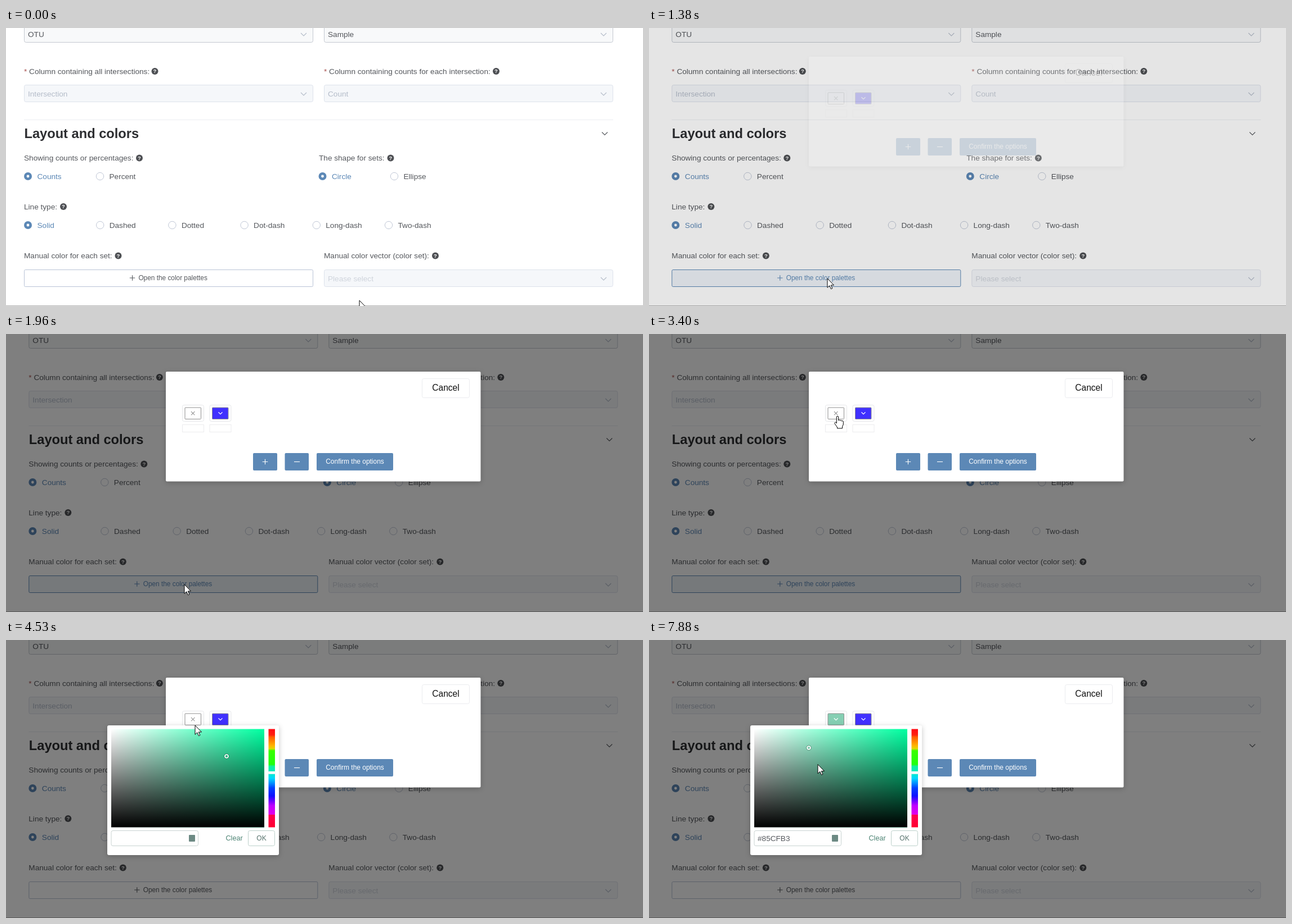
An HTML page that plays this animation: 1132 by 495 pixels, repeating every 8 s.

```html
<!DOCTYPE html>
<html lang="en">
<head>
<meta charset="utf-8">
<title>Color palette dialog</title>
<style>
  html, body { margin: 0; width: 100%; height: 100%; overflow: hidden; background: #fff; }
  svg { display: block; width: 1132px; height: 495px; font: 13.62px "Liberation Sans", Arial, sans-serif; }
  .line { fill: none; stroke-width: 1.1; }
  .shadow { filter: drop-shadow(0 2px 5px rgba(0, 0, 0, .22)); }
</style>
</head>
<body>
<svg id="stage" viewBox="0 0 1132 495">
  <defs>
    <linearGradient id="saturation"><stop stop-color="#fff"/><stop offset="1" stop-color="#00ffa1"/></linearGradient>
    <linearGradient id="value" x2="0" y2="1"><stop stop-color="#000" stop-opacity="0"/><stop offset="1"/></linearGradient>
    <linearGradient id="hue" x2="0" y2="1"></linearGradient>
  </defs>
</svg>
<script>
const LOOP = 8000;
const INK = '#55585d', PRIMARY = '#5c88b6', MUTED = '#b4bcc9';
const $ = id => document.getElementById(id);

// Text is placed by its vertical middle, with the baseline on a whole pixel
const text = (x, y, str, fill = INK, extra = '') =>
  `<text x="${x}" y="${Math.round(y + 4.8)}" fill="${fill}" ${extra}>${str}</text>`;
const box = (x, y, w, h, fill, stroke = 'none', r = 3, extra = '') =>
  `<rect x="${x}" y="${y}" width="${w}" height="${h}" rx="${r}" fill="${fill}" stroke="${stroke}" ${extra}/>`;
const path = (d, stroke, extra = '') => `<path class="line" d="${d}" stroke="${stroke}" ${extra}/>`;
const chevron = (x, y, stroke, s = 5) =>
  path(`M${x - s} ${y - s / 2}l${s} ${s} ${s} ${-s}`, stroke);
const plus = (x, y, stroke, extra) => path(`M${x - 4.7} ${y}h9.4m-4.7-4.7v9.4`, stroke, extra);

const help = (x, y) => `<circle cx="${x}" cy="${y}" r="6" fill="#4e5054"/>` +
  text(x, y - 1.4, '?', '#fff', 'font-size="9.5" font-weight="bold" text-anchor="middle"');
const label = (x, y, str, helpX) => text(x, y, str) + help(helpX, y);
const required = '<tspan fill="#a8504e">*</tspan> ';

const select = (x, y, str, fill, stroke, color) =>
  box(x + .5, y - 15.5, 513, 30, fill, stroke) + text(x + 7, y, str, color) + chevron(x + 497, y + .5, MUTED);

const radio = (x, y, str, on) => (on
  ? `<circle cx="${x}" cy="${y}" r="7" fill="${PRIMARY}"/><circle cx="${x}" cy="${y}" r="2.4" fill="#fff"/>`
  : `<circle cx="${x}" cy="${y}" r="6.7" fill="#fff" stroke="#c0c7d6"/>`) +
  text(x + 16.5, y, str, on ? PRIMARY : INK);

const lineTypes = ['Solid', 'Dashed', 'Dotted', 'Dot-dash', 'Long-dash', 'Two-dash'];

const page = `<rect width="1132" height="495" fill="#fff"/><g id="page">
  ${select(32, 11, 'OTU', '#f8f9fa', '#c3c8d0', INK)}
  ${select(565, 11, 'Sample', '#f8f9fa', '#c3c8d0', INK)}
  ${label(32, 77, required + 'Column containing all intersections:', 264.5)}
  ${label(565, 77, required + 'Column containing counts for each intersection:', 871)}
  ${select(32, 117, 'Intersection', '#f5f7fa', '#dde2eb', MUTED)}
  ${select(565, 117, 'Count', '#f5f7fa', '#dde2eb', MUTED)}
  ${path('M32 163.5H1079', '#ebedf2')}
  ${text(32.5, 190.8, 'Layout and colors', '#2d2e31', 'font-size="23.65" font-weight="bold"')}
  ${chevron(1064, 188, '#55585d')}
  ${label(32, 231.5, 'Showing counts or percentages:', 237)}
  ${label(556, 231.5, 'The shape for sets:', 683.5)}
  ${radio(39, 264, 'Counts', true)}${radio(167, 264, 'Percent')}
  ${radio(562.5, 264, 'Circle', true)}${radio(690, 264, 'Ellipse')}
  ${label(32, 318, 'Line type:', 102)}
  ${lineTypes.map((name, i) => radio(39 + i * 128.2, 351, name, i === 0)).join('')}
  ${label(32, 405.5, 'Manual color for each set:', 199.5)}
  ${label(565, 405.5, 'Manual color vector (color set):', 763)}
  ${box(32.5, 430.5, 513, 30, '#fff', '#b9c3d6', 2, 'id="open"')}
  ${plus(224.5, 445, INK, 'id="openPlus"')}
  ${text(235.4, 444.6, 'Open the color palettes', INK, 'id="openText" font-size="11.85"')}
  ${select(565, 446, 'Please select', '#f5f7fa', '#dde2eb', '#cfd4dc')}
  </g>${path('M0 494.5H1132', '#b4b4b4')}
  <rect id="overlay" width="1132" height="495" opacity="0"/>`;

const swatch = (x, fill, id) =>
  box(x + .5, 126.5, 38, 29, '#fff', '#e6e7ea') +
  box(x + 5, 131, 28.5, 20.5, fill, '#8f8f8f', 1, `id="${id}"`) +
  box(x + .5, 161.5, 38, 13, '#fff', '#ececee', 0);

const modal = `<g id="modal" opacity="0">
  ${box(284, 67, 559.5, 195.5, '#fff', 'none', 2, 'class="shadow"')}
  ${box(739.5, 79.5, 84, 34, '#fff', '#ebecef')}
  ${text(781.5, 96.5, 'Cancel', '#111', 'font-size="15.6" text-anchor="middle"')}
  ${swatch(313, '#fff', 'picked')}${swatch(361.5, '#4030ff', 'second')}
  ${path('M329 138l6.4 6.4m0-6.4l-6.4 6.4', '#9a9a9a', 'id="cross"')}
  <g id="pickedMark">${chevron(332.3, 141, '#fff', 3.5)}</g>${chevron(381, 141, '#fff', 3.5)}
  ${box(439, 212, 43, 31, PRIMARY, 'none', 2)}${plus(460.5, 227.5, '#fff')}
  ${box(495.5, 212, 42.5, 31, PRIMARY, 'none', 2)}${path('M512 227.5h10', '#fff')}
  ${box(552, 212, 136, 31, PRIMARY, 'none', 2)}
  ${text(620, 226.6, 'Confirm the options', '#fff', 'font-size="11.95" text-anchor="middle"')}
  </g>`;

const picker = `<g id="picker">
  ${box(180, 152, 305, 231, '#fff', 'none', 3, 'class="shadow"')}
  ${box(187, 158.5, 272, 175, 'url(#saturation)', 'none', 0)}
  ${box(187, 158.5, 272, 175, 'url(#value)', 'none', 0)}
  <g id="marker" fill="none"><circle r="4.2" stroke="#2a5a48" stroke-opacity=".7"/><circle r="3" stroke="#fff" stroke-width="1.7"/></g>
  ${box(466.5, 158.5, 11.5, 175, 'url(#hue)', 'none', 0)}
  ${box(466, 234, 12.5, 4.5, '#fff', '#e8e8e8', 1, 'stroke-width=".5"')}
  ${box(187, 339.5, 154.5, 27, '#fff', '#c9d3d2')}
  ${text(193, 353, '', INK, 'id="hex"')}
  ${box(325, 347, 11, 12, '#6d8a84', 'none', 1)}
  ${text(390.5, 352.6, 'Clear', '#4d8474', 'font-size="12.6"')}
  ${box(430.5, 339.5, 47, 27, '#fff', '#bcd0ca')}
  ${text(454, 352.6, 'OK', '#54706a', 'font-size="12" text-anchor="middle"')}
  </g>`;

const cursor = `<g id="cursor" stroke="#000" fill="#fff" stroke-linejoin="round">
  <path id="arrow" d="M0 0V16.3l3.8-3.6 2.6 6 2.5-1.1-2.6-5.7H11.5z"/>
  <path id="hand" d="M-1.7 13V2a1.7 1.7 0 0 1 3.4 0V8a1.6 1.6 0 0 1 3 .5a1.6 1.6 0 0 1 3 .8a1.4 1.4 0 0 1 2.6 .8V15l-1.8 4V22H-.5V20L-5 13.5a1.6 1.6 0 0 1 2.4-2z"/>
  <path id="aim" d="M-14 0H14M0-14V14"/></g>`;

$('stage').innerHTML += page + modal + picker + cursor;

// Hue strip: percentage of the height, color
$('hue').innerHTML = [
  [0, '#ff0a14'], [6, '#ff2010'], [8, '#ff5a00'], [17, '#ffb400'], [20, '#e0d800'], [22, '#38ff00'],
  [36, '#20ff10'], [38, '#10f0a0'], [46, '#00e8d0'], [50, '#00d8ff'], [55, '#0090ff'], [60, '#0040ff'],
  [68, '#1010ff'], [73, '#6800ff'], [78, '#c000ff'], [87, '#e000e8'], [87, '#ff0050'], [100, '#ff0030']
].map(([p, c]) => `<stop offset="${p}%" stop-color="${c}"/>`).join('');

// Cursor moves: first step, last step, number of steps, points passed
const moves = [
  [80, 810, 9, [[628, 485], [317, 446]]],
  [2380, 3130, 9, [[317, 446], [352, 405], [390, 310], [365, 215], [345, 163]]],
  [3240, 3330, 2, [[345, 163], [335, 146]]],
  [4530, 4530, 1, [[335, 146], [336, 152]]],
  [4624, 5000, 5, [[336, 152], [345, 187]]],
  [6110, 6210, 2, [[345, 187], [335, 186]]],
  [7050, 7420, 5, [[335, 186], [284, 192]]],
  [7810, 7880, 2, [[284, 192], [300, 221.5]]]
];
// Time, overlay opacity, dialog opacity
const dialogFade = [[0, 0, 0], [1180, .02, .03], [1280, .04, .06], [1380, .1, .2], [1810, .36, .48], [1960, .5, 1]];
const pickerZoom = [[0, 0], [3760, .2], [3860, .5], [4060, .75], [4110, .9], [4160, 1]];
// Time, marker x, marker y, color
const picks = [[0, 392, 207, ''], [5280, 345, 187, '#5AD7A8'], [6570, 335, 187, '#62D7AB'], [7600, 284, 192, '#85CFB3']];
const presses = [[5100, 5280], [6400, 6570], [7420, 7600]];

const latest = (list, t) => list.filter(entry => entry[0] <= t).pop();
const show = (id, on) => $(id).setAttribute('display', on ? 'inline' : 'none');
const set = (id, name, value) => $(id).setAttribute(name, value);

function cursorAt(t) {
  const move = latest(moves, t);
  if (!move) return moves[0][3][0];
  const [start, end, count, points] = move;
  const step = t >= end ? count : Math.floor((t - start) * (count - 1) / (end - start)) + 1;
  const along = step / count * (points.length - 1);
  const i = Math.min(Math.floor(along), points.length - 2);
  return points[i].map((v, axis) => v + (points[i + 1][axis] - v) * (along - i));
}

function draw(t) {
  const [x, y] = cursorAt(t);
  const [, dim, opacity] = latest(dialogFade, t);
  const [, zoom] = latest(pickerZoom, t);
  const [, markX, markY, color] = latest(picks, t);

  // The page moves over when its scrollbar goes away
  set('page', 'transform', `translate(${t >= 1080 ? 8.3 : 0})`);
  const active = y < 461 && t < 3600;
  set('open', 'fill', active ? '#eef3f8' : '#fff');
  set('open', 'stroke', active ? PRIMARY : '#b9c3d6');
  set('openPlus', 'stroke', active ? PRIMARY : INK);
  set('openText', 'fill', active ? PRIMARY : INK);

  set('overlay', 'opacity', dim);
  set('modal', 'opacity', opacity);
  set('modal', 'transform', `translate(0 ${-20 * (1 - opacity)})`);
  set('picked', 'fill', color || '#fff');
  show('cross', !color);
  show('pickedMark', color);

  show('picker', zoom);
  set('picker', 'opacity', zoom);
  set('picker', 'transform', `translate(0 ${152 * (1 - zoom)}) scale(1 ${zoom})`);
  set('marker', 'transform', `translate(${markX} ${markY})`);
  $('hex').textContent = color;

  const hand = active && t < 900 || t >= 3240 && t < 4530;
  const aim = presses.some(([from, to]) => t >= from && t < to);
  set('cursor', 'transform', `translate(${x} ${y})`);
  show('hand', hand);
  show('aim', aim);
  show('arrow', !hand && !aim);
}

const begin = performance.now();
function tick() {
  draw((performance.now() - begin) % LOOP);
  requestAnimationFrame(tick);
}
tick();
</script>
</body>
</html>
```
